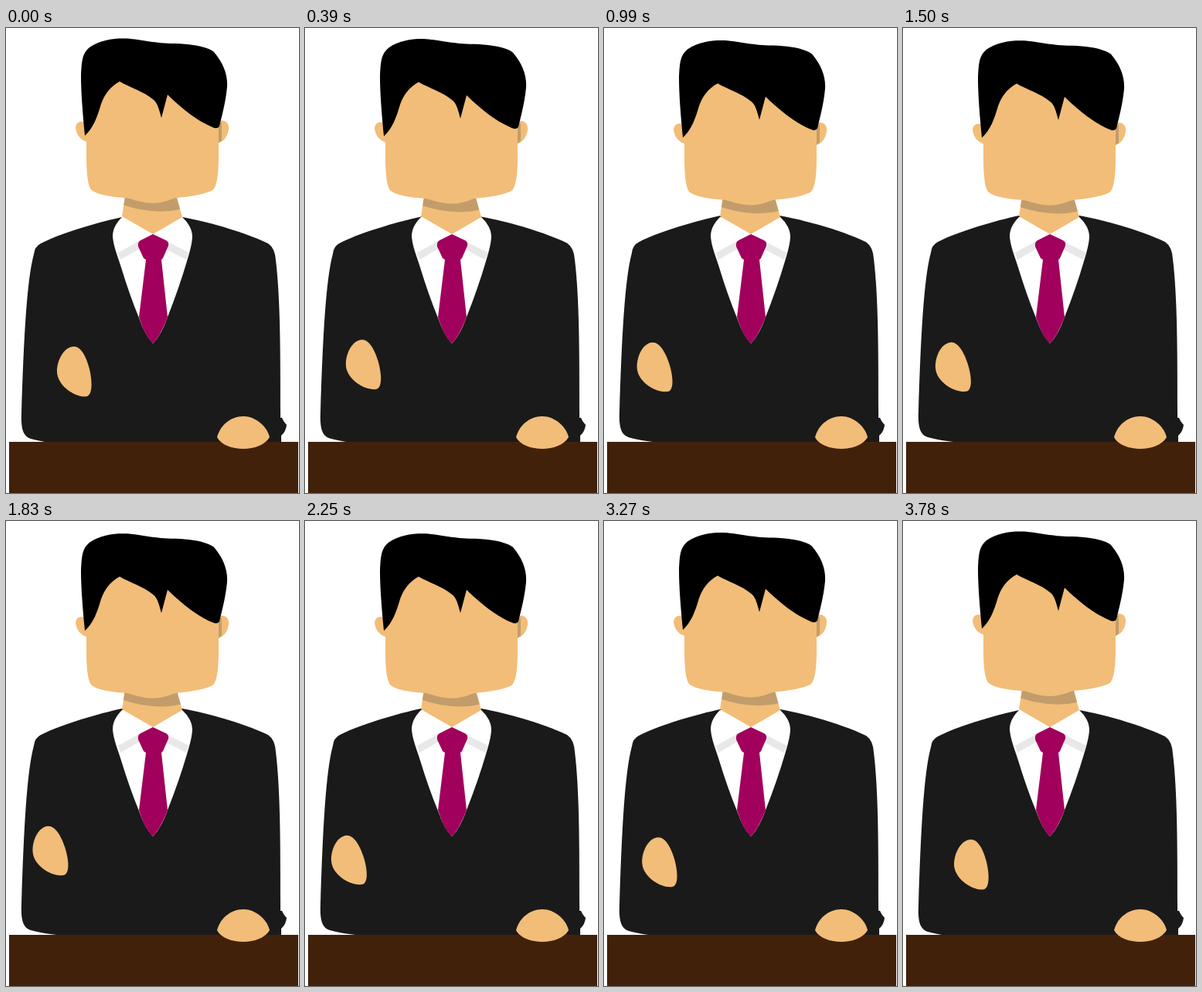
An HTML page for the animation above (4.5 s loop, 379x600 px).

```html
<!DOCTYPE html>
<html lang="en">
<head>
<meta charset="utf-8">
<title>Man at a desk</title>
<style>
  html, body { margin: 0; height: 100%; overflow: hidden; background: #fff; }
  svg { display: block; width: 379px; height: 600px; }
  .skin { fill: #f2bd78; }
  .shade { fill: #c29d6b; }
</style>
</head>
<body>
<svg viewBox="0 0 379 600">
  <clipPath id="neckShape"><path id="neck" d="M156 205H217L228 244 190 266 150 243Z"/></clipPath>

  <!-- Suit -->
  <g fill="#1a1a1a">
    <path id="jacket" d="M150 244C118 251 70 265 45 278Q37 282 36 292C27 325 23 400 20 497C19 519 23 527 32 530C42 533 56 535 74 537H355V500C355 420 355 350 349 300Q348 284 339 278C310 264 262 250 228 244Z"/>
    <path d="M350 503H357Q359 508 363 512Q362 521 356 526V536H335Z"/>
  </g>

  <!-- Shirt, collar and tie -->
  <path fill="#fff" d="M150 244C142 252 138 260 138 269C139 282 145 296 149 309Q160 345 172 374 180 397 190 407 201 396 209 373 224 335 234 301C238 288 241 277 241 268Q240 255 228 244Z"/>
  <path fill="#e8e8e8" d="M172 275L145 290 148 299 174 284ZM209 276L237 290 233 299 206 285Z"/>
  <path fill="#a1005c" d="M190 266L207 274Q211 276 210 281L203 297 201 299 209 373Q200 397 190 407 180 398 172 373L181 299 178 297 171 282Q170 276 174 274Z"/>

  <use href="#neck" class="skin"/>
  <g clip-path="url(#neckShape)">
    <path class="shade head" d="M145 205H230V233Q190 243 145 226Z"/>
  </g>

  <g class="head">
    <path class="skin" d="M105 123C97 118 90 122 90 129Q92 143 105 147Z"/>
    <path class="skin" d="M274 120C284 117 289 123 288 131Q286 145 274 149Z"/>
    <path class="shade" d="M272 122H279V145L274 149Z"/>
    <path class="skin" d="M104 120L125 60H250L275 120V165C275 188 273 207 266 210Q250 217 222 219C213 220 206 226 190 226S164 220 153 219Q122 217 112 210C106 207 104 188 104 165Z"/>
    <path d="M102 139C99 108 97 82 97 62C98 40 99 33 108 25C122 15 140 13 156 13.500C176 15 188 19 213 20C238 20 261 24 269 31C281 45 287 60 286 76C284 97 279 114 276 127Q273 131 267 128C249 121 226 103 209 86L201 116C198 105 196 96 190 92C178 82 161 77 147 69C134 76 127 87 123 98C118 115 113 129 102 139Z"/>
  </g>

  <path fill="#42210b" d="M4 534H378V600H4Z"/>
  <path class="skin" d="M273 528C278 510 293 501 307 501S337 512 341 528C335 538 321 543 307 543S278 538 273 528Z"/>
  <path id="hand" class="skin" d="M88 411C97 411 104 424 108 440C112 457 112 474 104 475.500C89 477 66 461 66 443C66 429 75 411 88 411Z"/>
</svg>
<script>
const LOOP = 4500;
const jacket = document.getElementById('jacket');
const hand = document.getElementById('hand');
const heads = document.querySelectorAll('.head');
const start = performance.now();

// Progress from 0 to 1 between two times
const ramp = (t, from, to) => Math.min(1, Math.max(0, (t - from) / (to - from)));
const easeInOut = p => (1 - Math.cos(Math.PI * p)) / 2;
const easeOut = p => 1 - (1 - p) ** 2;
const arc = p => Math.sin(Math.PI * p);

function move(el, x, y, tilt = 0) {
  el.setAttribute('transform', `translate(${x} ${y}) rotate(${tilt} 89 443)`);
}

function draw(now) {
  const t = Math.max(0, now - start) % LOOP;
  const stay = 1 - easeInOut(ramp(t, 2790, 3780));

  // The head sinks while the shoulders rise
  const lean = easeInOut(ramp(t, 0, 1200)) * stay;
  heads.forEach(head => move(head, 0, 2.8 * lean));
  move(jacket, 0, -2 * lean);

  // The hand swings out, lifts once more, then returns
  const swing = easeOut(ramp(t, 0, 1200)) * stay;
  const reach = easeInOut(ramp(t, 1500, 1900)) * stay;
  const lift = 6 * arc(ramp(t, 0, 900)) + 12 * arc(ramp(t, 1500, 2200)) ** 2;
  move(hand, -24 * swing - 8 * reach, -5.5 * swing - lift, -4 * swing);

  requestAnimationFrame(draw);
}
draw(start);
</script>
</body>
</html>
```
